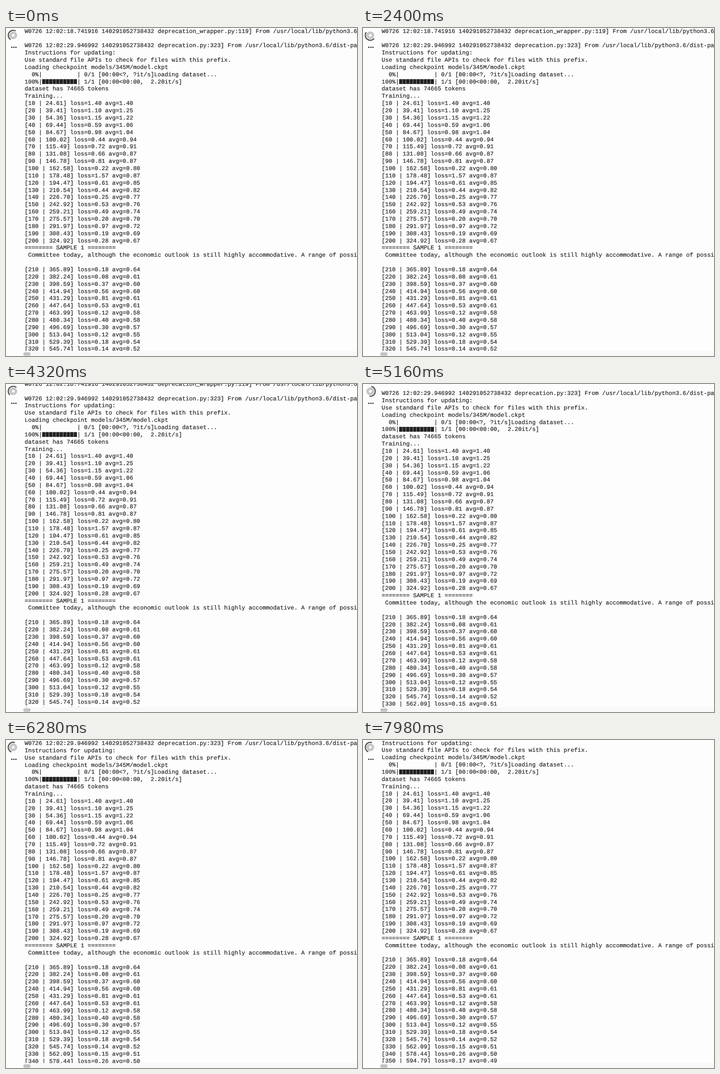
An HTML page that plays this animation: 772 px wide and 720 px high, repeating every 8000 ms.

```html
<!DOCTYPE html>
<html lang="en">
<head>
<meta charset="utf-8">
<title>Training log</title>
<style>
  html, body { margin: 0; width: 100%; height: 100%; overflow: hidden; background: #fdfdfd; }
  svg { display: block; width: 772px; height: 720px; }
  text {
    font-family: "Liberation Mono", "DejaVu Sans Mono", monospace;
    font-size: 12.84px;
    fill: #212121;
    stroke: #212121;
    stroke-width: .2px;
    white-space: pre;
    text-rendering: geometricPrecision;
  }
</style>
</head>
<body>
<svg viewBox="0 0 772 720">
  <defs><clipPath id="pane"><rect x="38" width="734" height="709"/></clipPath></defs>
  <rect width="772" height="720" fill="#fdfdfd"/>
  <g clip-path="url(#pane)"><g id="log"></g></g>

  <rect x="38" y="709.5" width="734" height="10.5" fill="#f8f8f9"/>
  <rect x="38" y="712" width="16" height="7.5" rx="3.7" fill="#c3c3c3"/>

  <circle cx="16" cy="16" r="8.6" fill="#c6c6c6"/>
  <rect x="13.2" y="13.2" width="5.6" height="5.6" rx="1" fill="#fdfdfd"/>
  <path id="arc" fill="none" stroke="#585858" stroke-width="2.6"/>
  <path d="M12.8 42.3h9.1" stroke="#333" stroke-width="3.2" stroke-linecap="round" stroke-dasharray="0 4.5"/>
</svg>
<script>
const NS = "http://www.w3.org/2000/svg";
const LOOP = 8000, LEFT = 41, CHAR = 7.704, PITCH = 15.86, BASE = 10.6;
const log = document.getElementById("log");
const arc = document.getElementById("arc");

const losses = "1.40 1.10 1.15 0.59 0.98 0.44 0.72 0.66 0.81 0.22 1.57 0.61 0.44 0.25 0.53 0.49 0.20 0.97 0.19 0.28 "
  + "0.18 0.08 0.37 0.56 0.81 0.53 0.12 0.40 0.30 0.12 0.18 0.14 0.15 0.26 0.17";

// Elapsed time slows gently, pauses for the sample, then runs evenly;
// the average is a decayed mean of the losses.
function trainingSteps() {
  let time = 24.61, sum = 0, weight = 0;
  return losses.split(" ").map((loss, i) => {
    const k = i - 1;
    if (i === 20) time += 40.97;
    else if (i > 20) time += 16.35;
    else if (i > 0) time += 14.8 + 0.15 * k - 0.0031 * k * k;
    sum = sum * 0.99 + Number(loss);
    weight = weight * 0.99 + 1;
    return `[${(i + 1) * 10} | ${time.toFixed(2)}] loss=${loss} avg=${(sum / weight).toFixed(2)}`;
  });
}

const steps = trainingSteps();
const lines = [
  "W0726 12:02:18.741916 140291052738432 deprecation_wrapper.py:119] From /usr/local/lib/python3.6/dist-packages",
  "",
  "W0726 12:02:29.946992 140291052738432 deprecation.py:323] From /usr/local/lib/python3.6/dist-packages",
  "Instructions for updating:",
  "Use standard file APIs to check for files with this prefix.",
  "Loading checkpoint models/345M/model.ckpt",
  "  0%|          | 0/1 [00:00<?, ?it/s]Loading dataset...",
  "100%|          | 1/1 [00:00<00:00,  2.20it/s]",
  "dataset has 74665 tokens",
  "Training...",
  ...steps.slice(0, 20),
  "======== SAMPLE 1 ========",
  " Committee today, although the economic outlook is still highly accommodative. A range of possible",
  "",
  ...steps.slice(20)
];

function add(tag, attrs, content = "") {
  const el = document.createElementNS(NS, tag);
  for (const key in attrs) el.setAttribute(key, attrs[key]);
  el.textContent = content;
  log.appendChild(el);
}

lines.forEach((line, i) => add("text", { x: LEFT, y: BASE + i * PITCH }, line));

// Filled progress bar
for (let col = 5; col < 15; col++) {
  add("rect", { x: LEFT + col * CHAR, y: BASE + 7 * PITCH - 9.3, width: 7.1, height: 10.6, fill: "#212121" });
}

// The log drifts up from 3.87 s, slowing down.
const scroll = t => 103.5 * (1 - Math.exp(-Math.max(0, t - 3870) / 6680));

// Uneven spinner: [time, degrees]
const turns = [[0, -60], [1380, 480], [3360, 1370], [4320, 1750], [5160, 2260], [6280, 2810], [LOOP, 3540]];

function spin(t) {
  const i = turns.findIndex(([end]) => end > t);
  const [t0, a0] = turns[i - 1], [t1, a1] = turns[i];
  return a0 + (a1 - a0) * (t - t0) / (t1 - t0);
}

function rim(deg) {
  const a = deg * Math.PI / 180;
  return `${(16 + 11 * Math.sin(a)).toFixed(2)} ${(16 - 11 * Math.cos(a)).toFixed(2)}`;
}

function draw(t) {
  log.setAttribute("transform", `translate(0 ${-scroll(t).toFixed(2)})`);
  const mid = spin(t);
  arc.setAttribute("d", `M${rim(mid - 88)}A11 11 0 0 1 ${rim(mid + 88)}`);
}

const start = performance.now();
function tick() {
  draw(Math.max(0, performance.now() - start) % LOOP);
  requestAnimationFrame(tick);
}
tick();
</script>
</body>
</html>
```
